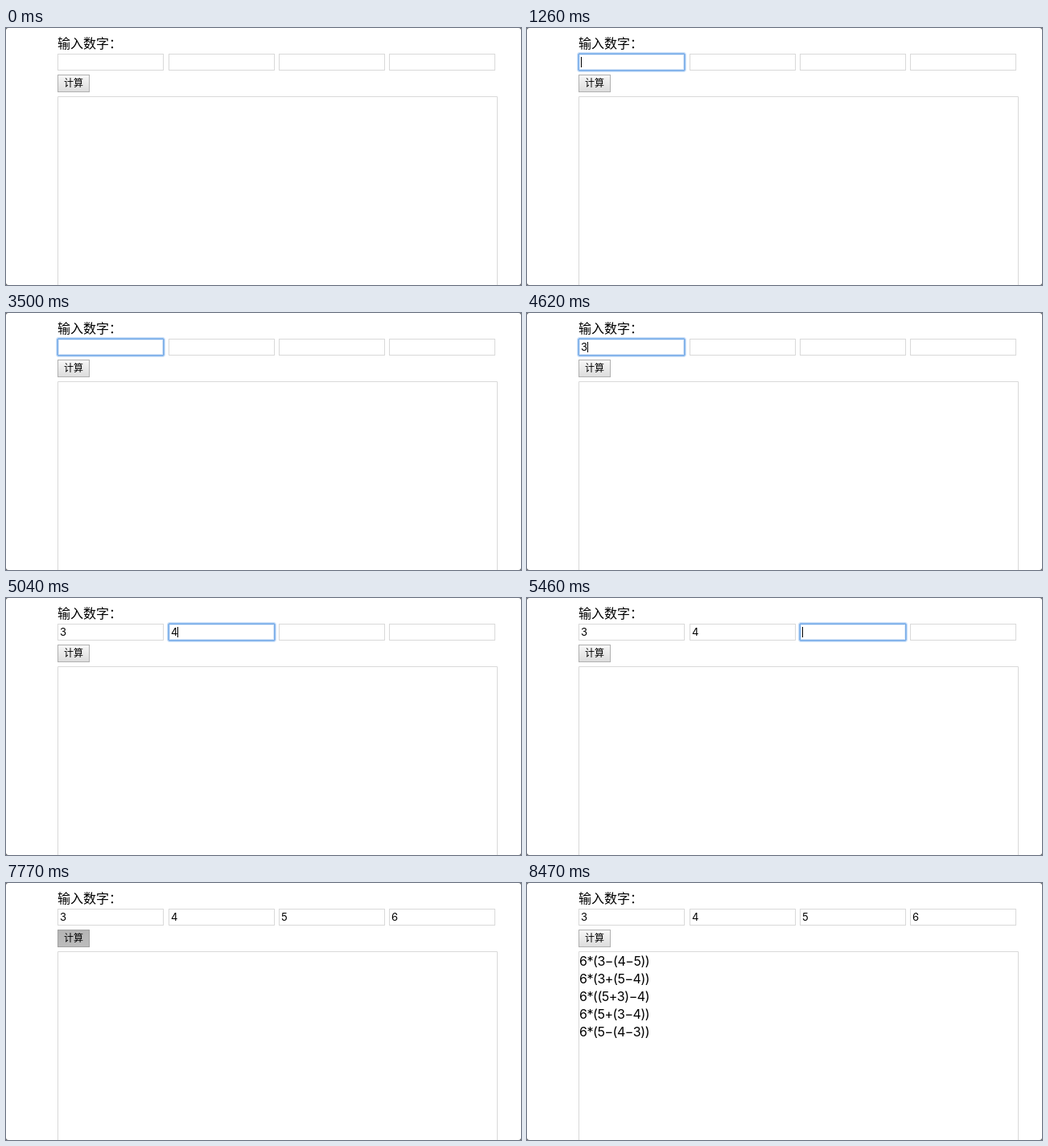
Animation of 640x320 px, one loop 9100 ms. Source, as an HTML page:

```html
<!DOCTYPE html>
<html lang="zh-CN">
<head>
<meta charset="utf-8">
<style>
html, body { margin: 0; width: 100%; height: 100%; overflow: hidden; background: #fff; }
svg { display: block; }
text { font-family: Inter, "Noto Sans CJK SC", "Noto Sans CJK", sans-serif; fill: #000; }
.box { fill: #fff; stroke: #d9d9d9; }
.ring rect { fill: none; }
.digit { font-size: 13px; }
.line { font-size: 16px; letter-spacing: -.45px; }
</style>
</head>
<body>
<svg id="stage" width="640" height="320" viewBox="0 0 640 320">
  <defs>
    <linearGradient id="up" x2="0" y2="1">
      <stop stop-color="#f8f8f8"/><stop offset="1" stop-color="#dcdcdc"/>
    </linearGradient>
    <linearGradient id="down" x2="0" y2="1">
      <stop stop-color="#b4b4b4"/><stop offset="1" stop-color="#bcbcbc"/>
    </linearGradient>
  </defs>
  <path d="M0 0h640v320H0z" fill="#555"/>
  <rect width="640" height="320" rx="3" fill="#fff"/>
  <text x="64" y="25" font-size="16">输入数字：</text>
  <g id="fields"></g>
  <rect id="button" x="64.5" y="58.5" width="39" height="21"/>
  <text x="72" y="73" font-size="12" font-weight="500">计算</text>
  <path class="box" d="M64.5 321V85.5H610.5V321"/>
  <g id="results"></g>
</svg>
<script>
const LOOP = 9100, PRESS = 7770, RELEASE = 7910;
const $ = id => document.getElementById(id);

function add(parent, tag, attrs, text = '') {
  const el = document.createElementNS('http://www.w3.org/2000/svg', tag);
  for (const k in attrs) el.setAttribute(k, attrs[k]);
  el.textContent = text;
  return parent.appendChild(el);
}

const show = (el, on) => el.setAttribute('visibility', on ? 'visible' : 'hidden');

// Glow layers: outset from the border centre, colour, corner radius
const glow = [[2, '#cfe2f8', 2.5], [1, '#94bff0', 1.5], [0, '#78abe6', 0], [-1, '#dceafa', 0]];

const fields = [64, 202, 339, 476].map(x => {
  const g = $('fields');
  add(g, 'rect', { class: 'box', x: x + .5, y: 32.5, width: 131, height: 20 });
  const ring = add(g, 'g', { class: 'ring' });
  for (const [d, stroke, rx] of glow)
    add(ring, 'rect', { x: x + .5 - d, y: 32.5 - d, width: 131 + 2 * d, height: 20 + 2 * d, rx, stroke });
  const text = add(g, 'text', { class: 'digit', x: x + 3, y: 47 });
  const caret = add(g, 'rect', { y: 36, width: 1, height: 13 });
  return { x, ring, text, caret };
});

['6*(3−(4−5))', '6*(3+(5−4))', '6*((5+3)−4)', '6*(5+(3−4))', '6*(5−(4−3))']
  .forEach((s, i) => add($('results'), 'text', { class: 'line', x: 65, y: 103 + 22 * i }, s));

// [time, focused field, typed digits, caret visible]
const steps = [
  [0, -1, '', 0],
  [1260, 0, '', 1], [1820, 0, '', 0],
  [1960, 0, '1', 1], [2450, 0, '1', 0], [3010, 0, '1', 1],
  [3360, 0, '', 1], [3500, 0, '', 0], [4060, 0, '', 1], [4550, 0, '', 0],
  [4620, 0, '3', 1], [4830, 1, '3', 1],
  [5040, 1, '34', 1], [5460, 2, '34', 1],
  [5740, 2, '345', 1], [6090, 3, '345', 1], [6650, 3, '345', 0],
  [6860, 3, '3456', 1], [7420, 3, '3456', 0],
  [PRESS, -1, '3456', 0]
];

function draw(t) {
  const [, focus, typed, blink] = steps.findLast(s => s[0] <= t);
  fields.forEach((f, i) => {
    const digit = typed[i] || '';
    f.text.textContent = digit;
    show(f.ring, i === focus);
    show(f.caret, i === focus && blink);
    f.caret.setAttribute('x', f.x + 3 + (digit === '1' ? 6 : digit ? 8 : 0));
  });
  const pressed = t >= PRESS && t < RELEASE;
  $('button').setAttribute('fill', pressed ? 'url(#down)' : 'url(#up)');
  $('button').setAttribute('stroke', pressed ? '#a0a0a0' : '#b0b0b0');
  show($('results'), t >= RELEASE);
}

const start = performance.now();
function tick() {
  draw((performance.now() - start) % LOOP);
  requestAnimationFrame(tick);
}
tick();
</script>
</body>
</html>
```
